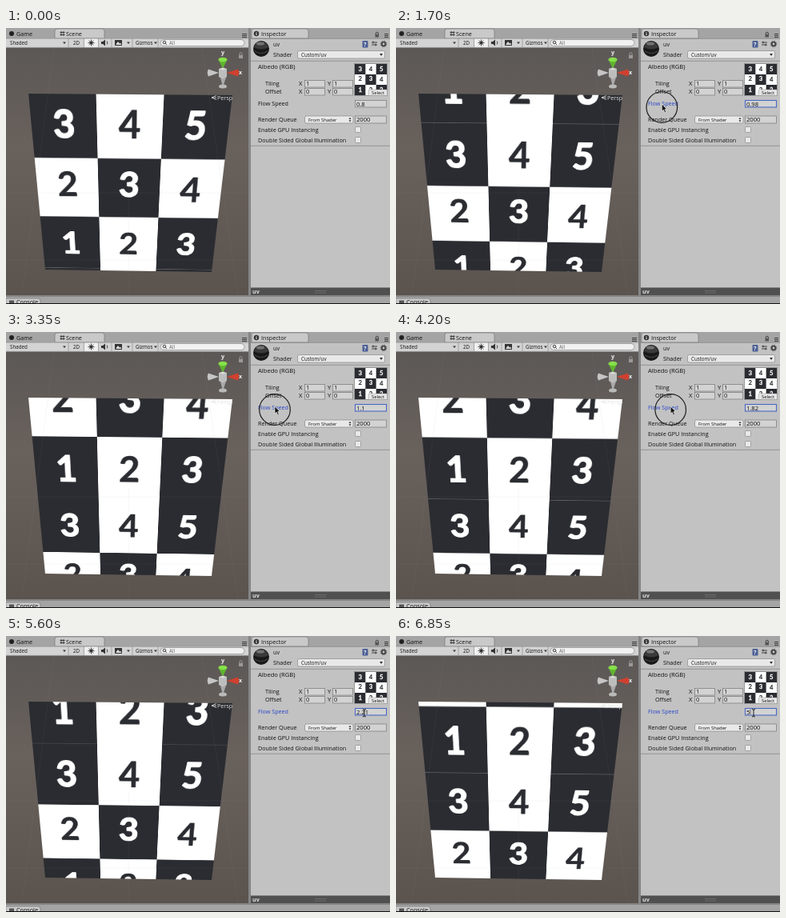
An HTML page for the animation above (6.9 s loop, 480 by 345 pixels).

```html
<!DOCTYPE html>
<html lang="en">
<head>
<meta charset="utf-8">
<title>Scrolling texture</title>
<style>
html, body { margin: 0; width: 100%; height: 100%; overflow: hidden; }
#stage { position: relative; width: 480px; height: 345px; overflow: hidden;
  background: linear-gradient(#5c5856 24px, #69615c 150px, #5a534e 335px); }
#quad { position: absolute; left: 0; top: 0; width: 300px; height: 300px;
  overflow: hidden; background: #fff; transform-origin: 0 0; }
svg { position: absolute; left: 0; top: 0; display: block; }
text { font-family: "Open Sans", "Noto Sans", sans-serif; font-size: 7.2px; fill: #111; }
#tile text { font: 700 58px Lato, sans-serif; text-anchor: middle; stroke-linejoin: round; }
.sm text, text.sm { font-size: 6.2px; }
.num text { font-size: 7.6px; }
.field { fill: #d3d3d3; stroke: #777; stroke-width: .7; }
.drop { fill: #e9e9e9; stroke: #888; stroke-width: .7; }
.line { fill: none; stroke: #333; stroke-width: .9; }
</style>
</head>
<body>
<div id="stage">
  <div id="quad">
    <svg width="300" height="300">
      <g id="scroll"><g id="tile"></g><use href="#tile" y="-300"/></g>
    </svg>
  </div>
  <svg width="480" height="345" viewBox="0 0 480 345">
    <!-- scene overlay -->
    <g stroke="#9a9a9a" stroke-width=".5" opacity=".16">
      <path d="M0 206H303M153 195V334M60 25L20 334M245 25L290 334M0 290H303"/>
    </g>
    <text x="264" y="90" style="fill:#e4e4e4">Persp</text>
    <path d="M263 84.5L257 87L263 89.5M263 87H257" fill="none" stroke="#e4e4e4" stroke-width=".8"/>
    <g>
      <path d="M268 62L271 74L275 62Z" fill="#a9a9a9"/>
      <ellipse cx="271" cy="73" rx="5" ry="2.5" fill="#b9b9b9"/>
      <path d="M253 51.5L266 56L253 60.5Q250.500 56 253 51.500Z" fill="#c5c5c5"/>
      <path d="M290 51.500L276 56L290 60.500Q292.500 56 290 51.500Z" fill="#d0402f"/>
      <path d="M265.500 39.500L271 51L276.500 39.500Z" fill="#5fb52e"/>
      <ellipse cx="271" cy="39.500" rx="5.500" ry="2.800" fill="#86e04a"/>
      <path d="M266 51L271 49.500L276 51V61L271 63L266 61Z" fill="#d9d9d9"/>
      <path d="M266 51L271 52.500L276 51V61L271 63L266 61Z" fill="#bdbdbd"/>
      <text x="269" y="33" style="fill:#eee;font-weight:700">y</text>
      <text x="291" y="58" style="fill:#eee;font-weight:700">x</text>
      <rect x="291" y="34" width="5" height="4" fill="#999"/>
      <path d="M292 34V31.500Q293.500 29.500 295 31.500V34" fill="none" stroke="#999"/>
    </g>

    <!-- left tabs and toolbar -->
    <rect width="303" height="13" fill="#a4a4a4"/>
    <path d="M61 13V4Q61 1 64 1H120Q123 1 123 4V13Z" fill="#c9c9c9" stroke="#777" stroke-width=".7"/>
    <circle cx="7" cy="7" r="3" fill="#222"/>
    <text x="13" y="9.600">Game</text>
    <path class="line" d="M69 4V10M72 4V10M67.500 5.500H73.500M67.500 8.500H73.500"/>
    <text x="75" y="9.600">Scene</text>
    <rect y="13" width="303" height="11.500" fill="#d3d3d3"/>
    <rect x="97.500" y="13" width="18" height="11" fill="#f0f0f0"/>
    <path d="M0 13.200H303M0 24.400H303M78 13V24M97.500 13V24M115.500 13V24M132 13V24M158 13V24M190 13V24" stroke="#909090" stroke-width=".7"/>
    <g class="sm">
      <text x="5" y="21">Shaded</text><text x="84" y="21">2D</text>
      <text x="162" y="21">Gizmos</text>
    </g>
    <path d="M71 17.500H75L73 20ZM151 17.500H155L153 20ZM185 17.500H189L187 20Z" fill="#333"/>
    <path class="line" d="M106.500 14.500V22.500M102.500 18.500H110.500M103.700 15.700L109.300 21.300M109.300 15.700L103.700 21.300"/>
    <circle cx="106.500" cy="18.500" r="2" fill="#333"/>
    <path d="M119 17H121L124 14.500V22.500L121 20H119Z" fill="#333"/>
    <path class="line" d="M126 16.500Q128 18.500 126 20.500"/>
    <rect x="136" y="15" width="9" height="7" fill="#333"/>
    <path d="M137 21L140 17L142 19.500L143 18.500L144.500 21Z" fill="#ddd"/>
    <rect x="193" y="14.500" width="105" height="8" rx="4" fill="#f1f1f1" stroke="#888" stroke-width=".7"/>
    <circle class="line" cx="198" cy="18" r="1.800"/><path class="line" d="M199.300 19.300L201 21"/>
    <text class="sm" x="204" y="20.800" style="fill:#666">All</text>

    <!-- inspector -->
    <rect x="303" width="3" height="336" fill="#858585"/>
    <rect x="306" width="174" height="336" fill="#c2c2c2"/>
    <rect x="306" width="174" height="13" fill="#a4a4a4"/>
    <path d="M307 13V4Q307 1 310 1H375Q378 1 378 4V13Z" fill="#c9c9c9" stroke="#777" stroke-width=".7"/>
    <circle cx="313" cy="7" r="3.200" fill="#333"/>
    <path d="M313 5V5.800M313 6.500V9" stroke="#fff"/>
    <text x="319" y="9.600">Inspector</text>
    <path class="line" d="M295 7.500H301M295 9.500H301M295 11.500H301M473 7.500H478M473 9.500H478M473 11.500H478"/>
    <rect x="461.500" y="8" width="4.500" height="3.500" fill="#555"/>
    <path class="line" d="M462.300 8V6Q463.800 4.500 465.300 6V8"/>
    <path d="M306 13.300H480M306 41.300H480M306 147.300H480" stroke="#888" stroke-width=".8"/>
    <circle cx="319" cy="26" r="10" fill="#191919"/>
    <path d="M310 24Q319 29 328 24Q326 17 319 16.500Q312 17 310 24Z" fill="#3a3a3a"/>
    <ellipse cx="318" cy="19.500" rx="5" ry="2" fill="#737373"/>
    <path d="M311 29Q319 34 327 29" fill="none" stroke="#4a4a4a"/>
    <text x="334" y="23">uv</text><text x="334" y="35.600">Shader</text>
    <rect class="drop" x="364.500" y="28.500" width="109" height="9.500" rx="2"/>
    <text class="sm" x="369" y="35.500">Custom/uv</text>
    <path d="M467 32H471L469 35Z" fill="#333"/>
    <rect x="445.500" y="16" width="7" height="8.500" rx="1" fill="#4b5f94"/>
    <text x="447.200" y="23" style="fill:#fff;font-size:6.500px;font-weight:700">?</text>
    <path class="line" d="M457 18H464M457 21H464M459 16.500V19.500M462 19.500V22.500"/>
    <circle cx="472" cy="20" r="2.300" fill="none" stroke="#444" stroke-width="1.800"/>
    <circle cx="472" cy="20" r="3.700" fill="none" stroke="#444" stroke-dasharray="1.400 1.500"/>

    <text x="315" y="51.300" style="font-size:7.600px">Albedo (RGB)</text>
    <rect x="435.500" y="44.500" width="41" height="40" fill="#fff" stroke="#777" stroke-width=".7"/>
    <use href="#tile" transform="translate(436 45) scale(.1333 .13)"/>
    <rect x="453" y="77" width="23.500" height="7.500" rx="1" fill="#e6e6e6" stroke="#888" stroke-width=".5"/>
    <text x="457" y="83" style="font-size:5.800px">Select</text>
    <text x="324" y="72">Tiling</text><text x="324" y="82">Offset</text>
    <g id="vectors" class="num"></g>
    <text id="label" x="315" y="97">Flow Speed</text>
    <rect id="box" class="field" x="436.500" y="90.500" width="39" height="8.500"/>
    <rect id="sel" x="437.500" y="91.300" width="16.500" height="7" fill="#7d9fd0"/>
    <g class="num"><text id="value" x="438" y="97.500"></text></g>
    <path id="caret" d="M443 91.500V98" stroke="#222" stroke-width=".6"/>
    <text x="315" y="117">Render Queue</text>
    <rect class="drop" x="373.500" y="110" width="60.500" height="9" rx="2"/>
    <text x="378" y="116.700" style="font-size:5.900px">From Shader</text>
    <path d="M428.500 114L430 111.800L431.500 114ZM428.500 115.200L430 117.400L431.500 115.200Z" fill="#333"/>
    <rect class="field" x="436.500" y="110" width="39" height="9"/>
    <g class="num"><text x="438" y="117.200">2000</text></g>
    <text x="315" y="130">Enable GPU Instancing</text>
    <text x="315" y="142.700">Double Sided Global Illumination</text>
    <rect class="drop" x="436.500" y="123.500" width="7" height="7" rx="1"/>
    <rect class="drop" x="436.500" y="136.500" width="7" height="7" rx="1"/>
    <rect x="306" y="324.500" width="174" height="10.500" fill="#505050"/>
    <text x="308" y="332" style="fill:#ddd;font-weight:700">uv</text>
    <path d="M386 328.500H400M386 331H400" stroke="#777" stroke-width=".7"/>

    <!-- console strip -->
    <rect y="334" width="480" height="11" fill="#a4a4a4"/>
    <rect y="334" width="480" height="2" fill="#858585"/>
    <path d="M0 345V338H40Q43 338 43 341V345Z" fill="#c9c9c9" stroke="#777" stroke-width=".7"/>
    <rect x="4" y="340.500" width="6" height="4.500" fill="#555"/>
    <text x="13" y="345">Console</text>
    <rect y="344" width="480" height="1" fill="#111"/>

    <!-- pointers -->
    <g id="mouse">
      <circle id="ring" r="19.300" fill="none" stroke="#1c1c1c" stroke-width="1.200"/>
      <path id="arrow" d="M0 -4V5L2.100 3.200L3.700 6.700L5.300 6L3.700 2.600H6.400Z" fill="#111" stroke="#fff" stroke-width=".6"/>
      <path id="beam" d="M-2 -4.500Q0 -4.500 0 -3Q0 -4.500 2 -4.500M0 -3V3.500M-2 5Q0 5 0 3.500Q0 5 2 5" fill="none" stroke="#111" stroke-width=".9"/>
    </g>
  </svg>
</div>
<script>
const LOOP = 6900, STEP = 50;
const PRESS = 600, RELEASE = 4700, SELECT = 5650, TYPE = 6470;
const $ = id => document.getElementById(id);

// Key lists: [time, value, ...]
const flow = [[0, -.015], [1050, 1.115], [2300, 3.084], [3350, 4.52],
  [5000, 8.412], [6200, 11.989], [TYPE, 12.793], [6850, 15.355]];
const speed = [[0, .8], [1150, .8], [2300, 1.16], [3350, 1.1], [4650, 2.21]];
const pointer = [[200, 350, 125], [550, 328, 100], [1150, 328, 100], [2300, 337, 98],
  [3350, 336, 97], [4650, 347, 97], [5000, 347, 97], [5450, 448, 96], [6850, 447, 96]];

function sample(keys, t) {
  const i = keys.findIndex(k => k[0] > t);
  if (i < 0) return keys[keys.length - 1].slice(1);
  if (i === 0) return keys[0].slice(1);
  const a = keys[i - 1], b = keys[i], u = (t - a[0]) / (b[0] - a[0]);
  return a.slice(1).map((v, n) => v + (b[n + 1] - v) * u);
}

function buildTile() {
  const lift = [[-2, -2, -1], [-7, -7, 1], [0, 0, 0]];
  let out = '';
  for (let r = 0; r < 3; r++) for (let c = 0; c < 3; c++) {
    const dark = c % 2 === 0 ? r !== 1 : r === 1;
    const ink = dark ? '#fff' : '#2a2c31';
    if (dark) out += `<rect x="${c * 100}" y="${r * 100}" width="100" height="100" fill="#2a2c31"/>`;
    out += `<text x="${c * 100 + 50}" y="${r * 100 + 71 + lift[r][c]}" style="fill:${ink};stroke:${ink};` +
      `stroke-width:${dark ? 2 : .6}">${3 - r + c}</text>`;
  }
  $('tile').innerHTML = out;
}

function buildVectors() {
  let out = '';
  [65.5, 75.5].forEach((y, row) => [['X', 366, 373.5], ['Y', 402, 408.5]].forEach(([name, x, fx]) => {
    out += `<text x="${x}" y="${y + 6.5}">${name}</text>` +
      `<rect class="field" x="${fx}" y="${y}" width="25" height="8.5"/>` +
      `<text x="${fx + 1.5}" y="${y + 6.9}">${1 - row}</text>`;
  }));
  $('vectors').innerHTML = out;
}

// Projective map of a square with the given side onto four corners
function project(size, [x0, y0], [x1, y1], [x2, y2], [x3, y3]) {
  const sx = x0 - x1 + x2 - x3, sy = y0 - y1 + y2 - y3;
  const ax = x1 - x2, ay = y1 - y2, bx = x3 - x2, by = y3 - y2;
  const den = ax * by - bx * ay;
  const g = (sx * by - bx * sy) / den, h = (ax * sy - sx * ay) / den;
  const m = [x1 - x0 + g * x1, y1 - y0 + g * y1, 0, g,
    x3 - x0 + h * x3, y3 - y0 + h * y3, 0, h];
  return `matrix3d(${m.map(v => (v / size).toFixed(9))},0,0,1,0,${x0},${y0},0,1)`;
}

function show(id, on) { $(id).style.display = on ? '' : 'none'; }

function draw(t) {
  const [phase] = sample(flow, t);
  $('scroll').setAttribute('transform', `translate(0 ${(phase - Math.floor(phase)) * 300})`);

  const [raw] = sample(speed, t);
  const value = .8 + Math.round((raw - .8) / .03) * .03;
  $('value').textContent = t >= TYPE ? '5' : +value.toFixed(2);

  const focus = t >= PRESS;
  $('label').style.fill = focus ? '#2846c8' : '#111';
  $('box').style.stroke = focus ? '#4a68c4' : '#777';
  $('box').style.strokeWidth = focus ? 1.1 : .7;
  show('sel', t >= SELECT && t < TYPE);
  show('caret', t >= TYPE);

  const [x, y] = sample(pointer, t);
  const overField = x > 436;
  $('mouse').setAttribute('transform', `translate(${x} ${y})`);
  show('mouse', t >= 200);
  show('ring', t >= PRESS && t < RELEASE);
  show('arrow', !overField);
  show('beam', overField);
}

buildTile();
buildVectors();
$('quad').style.transform = project(300, [28, 82], [283, 84], [257, 305], [49, 302]);

const start = performance.now();
function tick() {
  const t = (performance.now() - start) % LOOP;
  draw(Math.floor(t / STEP) * STEP);
  requestAnimationFrame(tick);
}
tick();
</script>
</body>
</html>
```
